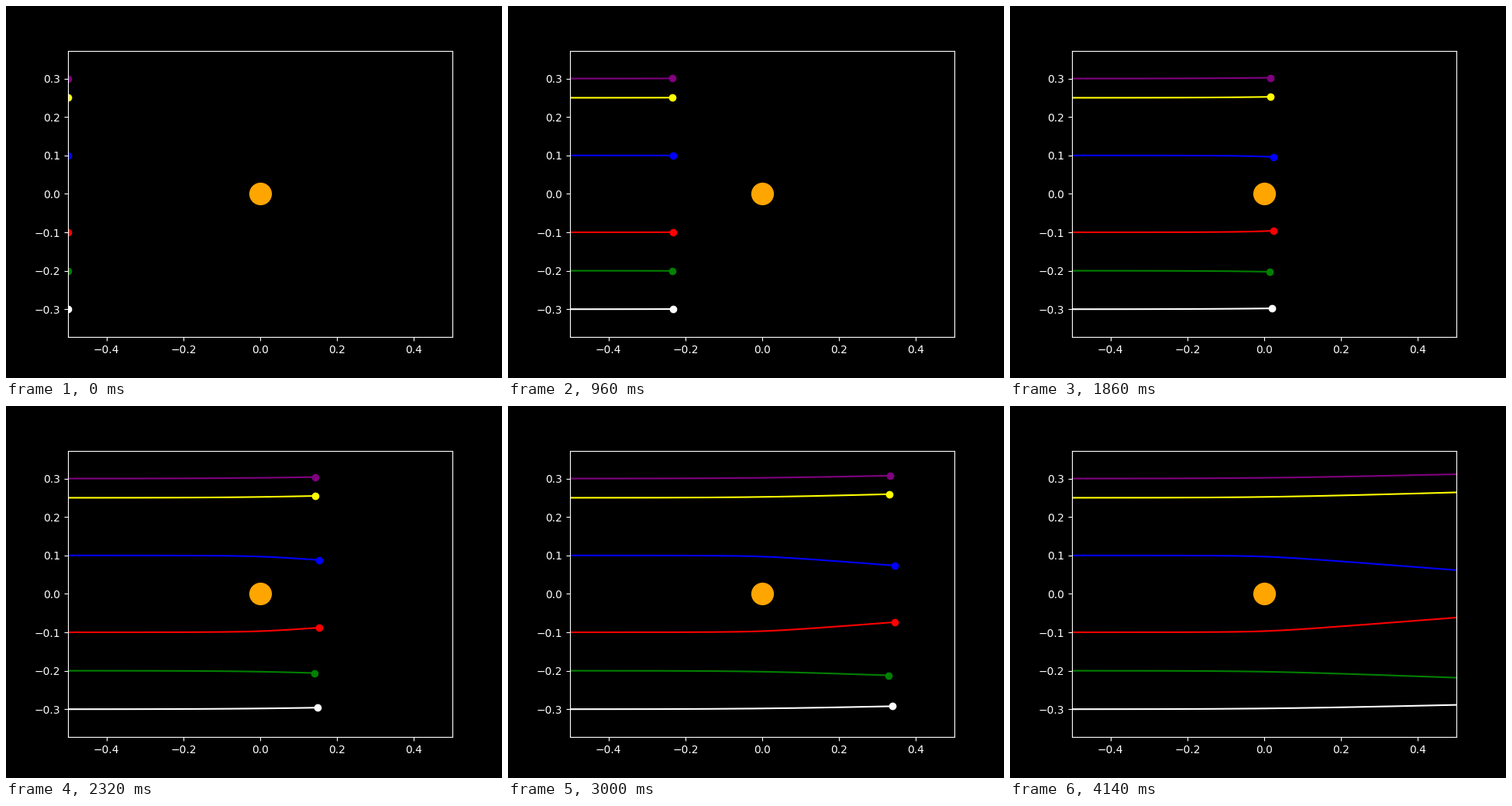
Write a matplotlib script that moves like this. It is 640 px wide and 480 px high and loops after 8660 ms.

```python
import numpy as np
import matplotlib.pyplot as plt
from matplotlib.animation import FuncAnimation

FRAMES, INTERVAL = 433, 20
SUBSTEPS = 8
SPEED = 0.005567            # axis units per frame
COUPLING = 0.0039 * SPEED**2

# colour, starting height, sign of the force (+1 repels, -1 attracts)
PARTICLES = [
    ("red", -0.1, -1),
    ("blue", 0.1, -1),
    ("green", -0.2, 1),
    ("yellow", 0.25, 1),
    ("purple", 0.3, 1),
    ("white", -0.3, -1),
]


def simulate():
    """Leapfrog paths through an inverse-square field, one point per frame."""
    heights = np.array([p[1] for p in PARTICLES])
    signs = np.array([p[2] for p in PARTICLES])
    pos = np.array([np.full(len(heights), -0.5), heights])
    vel = np.array([np.full(len(heights), SPEED), np.zeros(len(heights))])
    dt = 1 / SUBSTEPS

    def accel(p):
        return signs * COUPLING * p / np.hypot(*p) ** 3

    path = [pos.copy()]
    for _ in range(FRAMES - 1):
        for _ in range(SUBSTEPS):
            vel += accel(pos) * dt / 2
            pos += vel * dt
            vel += accel(pos) * dt / 2
        path.append(pos.copy())
    return np.array(path)


plt.style.use("dark_background")
fig, ax = plt.subplots(figsize=(6.4, 4.8), dpi=100)
half_height = 0.5 * 369.6 / 496
ax.set_xlim(-0.5, 0.5)
ax.set_ylim(-half_height, half_height)

ax.plot(0, 0, "o", color="orange", markersize=20)
trails = [ax.plot([], [], color=c)[0] for c, _, _ in PARTICLES]
dots = [ax.plot([], [], "o", color=c)[0] for c, _, _ in PARTICLES]
path = simulate()


def update(i):
    for k, (trail, dot) in enumerate(zip(trails, dots)):
        trail.set_data(path[:i + 1, 0, k], path[:i + 1, 1, k])
        dot.set_data(path[i:i + 1, 0, k], path[i:i + 1, 1, k])
    return trails + dots


anim = FuncAnimation(fig, update, frames=FRAMES, interval=INTERVAL,
                     init_func=lambda: update(0), repeat=True, repeat_delay=0)
plt.show()
```
